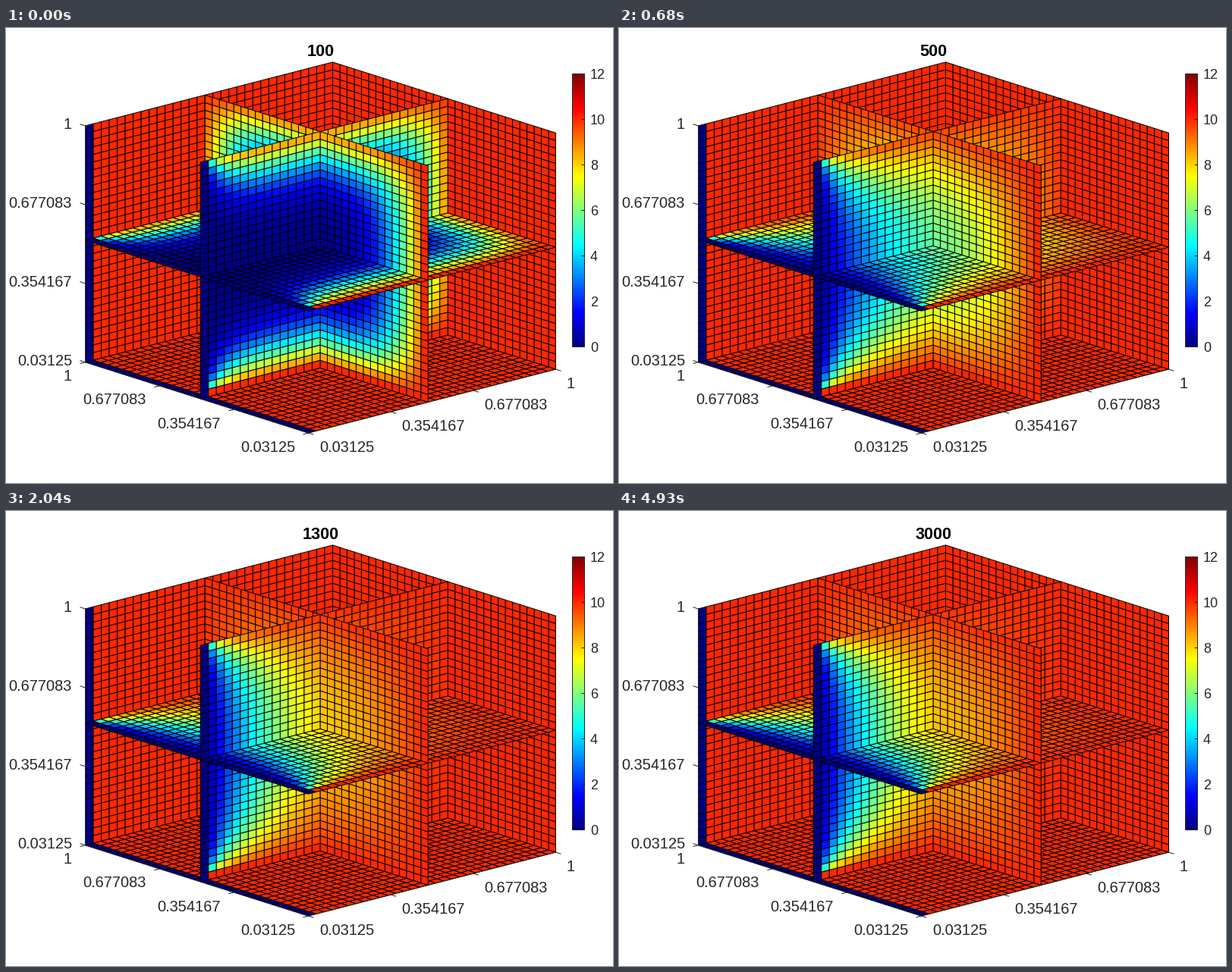
Recreate the animation shown at these times as a matplotlib script. Size 800 by 600 pixels, loop 5100 ms.

```python
import numpy as np
import matplotlib.pyplot as plt
from matplotlib.animation import FuncAnimation
from matplotlib.collections import LineCollection, PolyCollection
from matplotlib.patches import Rectangle

N = 32                    # grid points per side
M = N - 1                 # cells per side
CUT = (15, 15, 16)        # grid index of each slice plane
RATE = 1 / 8              # diffusion number of one step
STEPS, FRAMES, INTERVAL = 100, 30, 170
VMAX = 12

ORIGIN = np.array([398.5, 534.0])
AXES = np.array([[326.0, -84.0], [-294.0, -93.3], [0.0, -311.7]])
INK = "#262626"


def jet(values):
    level = np.clip(np.floor(np.asarray(values) / VMAX * 256), 0, 255)
    x = (level + 1) / 256
    return np.stack([np.clip(1.5 - abs(4 * x - c), 0, 1) for c in (3, 2, 1)], -1)


def project(points):
    return ORIGIN + np.asarray(points, float) / M @ AXES


def solve():
    """Heat the cube from five hot faces; keep the state of every frame."""
    t = np.zeros((N, N, N))
    for axis in range(3):
        face = np.moveaxis(t, axis, 0)
        face[0] = face[-1] = 10
    t[0] = 0
    states = []
    for _ in range(FRAMES):
        for _ in range(STEPS):
            core = t[1:-1, 1:-1, 1:-1]
            near = (t[2:, 1:-1, 1:-1] + t[:-2, 1:-1, 1:-1]
                    + t[1:-1, 2:, 1:-1] + t[1:-1, :-2, 1:-1]
                    + t[1:-1, 1:-1, 2:] + t[1:-1, 1:-1, :-2])
            t[1:-1, 1:-1, 1:-1] = core + RATE * (near - 6 * core)
        states.append(t.copy())
    return states


def plane(axis, index):
    """Lower corners and outlines of all cells on one grid plane."""
    a, b = [k for k in range(3) if k != axis]
    i, j = np.divmod(np.arange(M * M), M)
    base = np.zeros((M * M, 3), int)
    base[:, axis], base[:, a], base[:, b] = index, i, j
    ea, eb = np.eye(3, dtype=int)[[a, b]]
    quads = np.stack([base, base + ea, base + ea + eb, base + eb], 1)
    return base, quads


def build_cells():
    """Cells of walls and slices, ordered from back to front."""
    walls = [plane(1, M), plane(0, M), plane(2, 0)]
    cuts = [plane(k, CUT[k]) for k in range(3)]
    base = np.concatenate([p[0] for p in cuts])
    quads = np.concatenate([p[1] for p in cuts])
    side = np.sign(quads.mean(1) - CUT)
    order = np.argsort(side @ [-1, -1, 1], kind="stable")
    base = np.concatenate([p[0] for p in walls] + [base[order]])
    quads = np.concatenate([p[1] for p in walls] + [quads[order]])
    return base, project(quads)


def label(x, y, text, size=20, ha="left", **kw):
    return ax.text(x, y + 0.355 * size, text, fontsize=size * 0.72, ha=ha,
                   va="baseline", family="Liberation Sans",
                   **{"color": INK, **kw})


fig = plt.figure(figsize=(8, 6), dpi=100, facecolor="white")
ax = fig.add_axes([0, 0, 1, 1])
ax.axis("off")

base, quads = build_cells()
colors = [jet(t[tuple(base.T)]) for t in solve()]
cells = PolyCollection(quads, facecolors=colors[0], edgecolors="black",
                       linewidths=0.72, snap=False)
ax.add_collection(cells)

# axis lines, ticks and tick labels
front, left, right = project([[0, 0, 0], [0, M, 0], [M, 0, 0]])
top_left = project([0, M, M])
lines = [(left, front), (front, right), (left, top_left)]
names = ["0.03125", "0.354167", "0.677083", "1"]
for k, name in enumerate(names):
    s = k / 3
    on_u = front + s * AXES[0]
    on_v = front + s * AXES[1]
    on_z = left + s * AXES[2]
    lines += [(on_u, on_u + (7, 2.2)), (on_v, on_v + (-7, 1.8)),
              (on_z, on_z + (-7, -2.2))]
    label(on_u[0] + 14.5, on_u[1] + 18, name)
    label(on_v[0] - 17.5, on_v[1] + 17.5, name, ha="right")
    label(on_z[0] - 17.5, on_z[1] - 3, name, ha="right")

# colour bar
x0, x1, y0, y1 = 746.5, 762.5, 60.5, 420.5
bar = jet((np.arange(256) + 0.5) / 256 * VMAX)[:, None]
ax.imshow(bar, extent=(x0, x1, y1, y0), origin="lower", aspect="auto",
          interpolation="nearest")
ax.set(xlim=(0, 800), ylim=(600, 0))
ax.add_patch(Rectangle((x0, y0), x1 - x0, y1 - y0, fill=False, ec=INK,
                       lw=0.72, snap=False))
for v in range(0, VMAX + 1, 2):
    y = y1 + (y0 - y1) * v / VMAX
    lines.append(((x1 - 4, y), (x1, y)))
    label(770, y + 0.5, str(v), 18)
ax.add_collection(LineCollection(lines, colors=INK, linewidths=0.72,
                                 snap=False))

title = label(414.3, 29.5, "", 21.7, "center", weight="bold", color="black")


def draw(i):
    cells.set_facecolor(colors[i])
    title.set_text(str((i + 1) * STEPS))
    return cells, title


anim = FuncAnimation(fig, draw, frames=FRAMES, interval=INTERVAL,
                     repeat=True, repeat_delay=0, blit=False)
plt.show()
```
